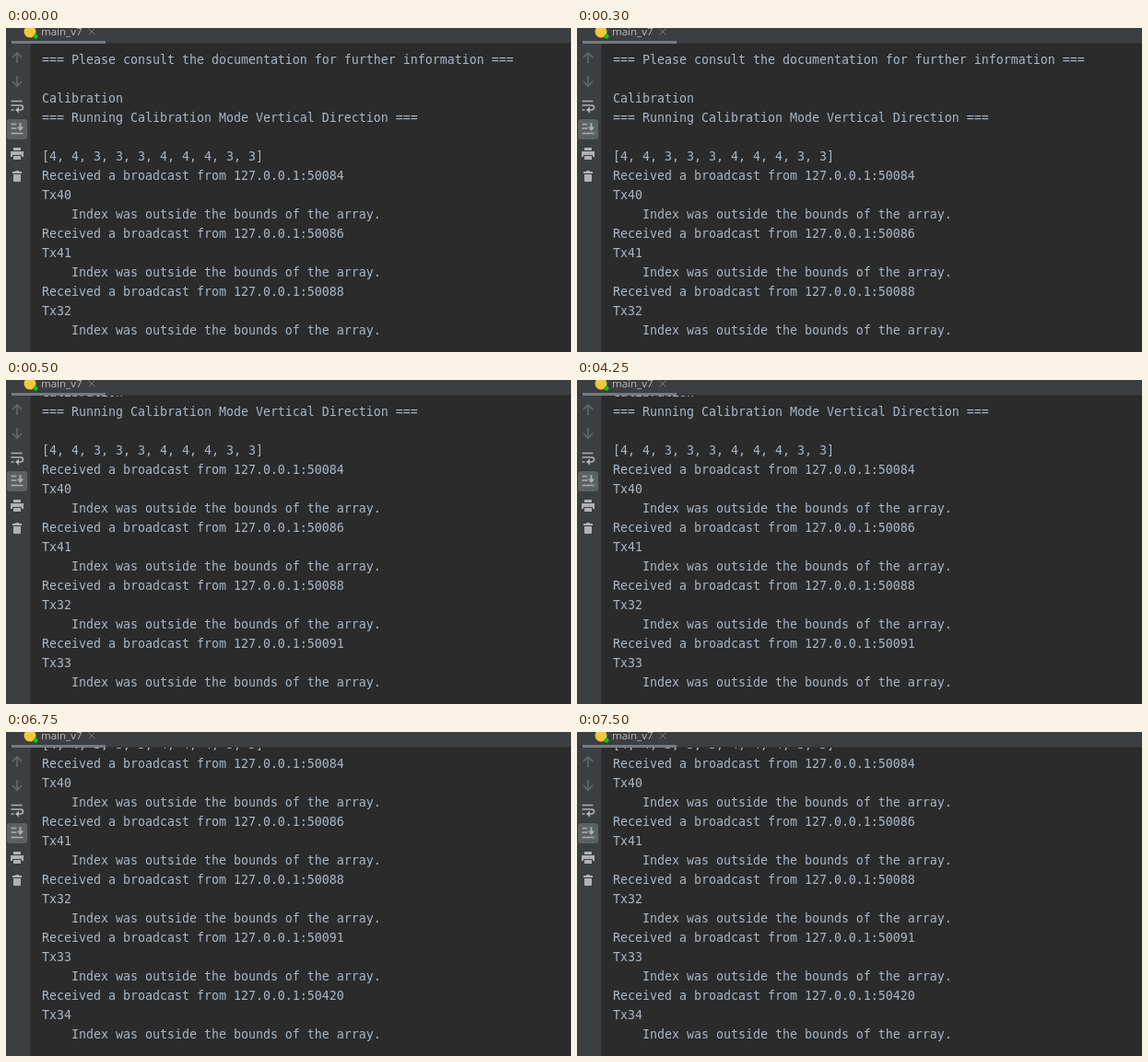
These frames come from a looping animation (613 px wide and 352 px high, 8000 ms). An HTML page:

```html
<!DOCTYPE html>
<html lang="en">
<head>
<meta charset="utf-8">
<title>Console log</title>
<style>
  html, body { margin: 0; width: 100%; height: 100%; overflow: hidden; background: #2b2b2b; }
  svg { display: block; width: 613px; height: 352px; }
  #log text { font: 13.29px "DejaVu Sans Mono", "Noto Sans Mono", monospace; fill: #a9b7c6; white-space: pre; }
  .tab { font: 11.5px "Open Sans", "Noto Sans", sans-serif; fill: #bbbbbb; }
  .icon { fill: none; stroke: #afb1b3; stroke-width: 1.7; }
  .off { stroke: #64676a; }
  .solid { fill: #afb1b3; stroke: none; }
</style>
</head>
<body>
<svg viewBox="0 0 613 352">
  <defs>
    <clipPath id="view"><rect x="27" y="17" width="586" height="335"/></clipPath>
  </defs>
  <rect width="613" height="352" fill="#2b2b2b"/>
  <g clip-path="url(#view)"><g id="log"></g></g>

  <!-- toolbar and tab strip -->
  <rect width="26" height="352" fill="#3c3f41"/>
  <rect x="26" y="17" width="1" height="335" fill="#323434"/>
  <rect width="613" height="16" fill="#3c3f41"/>
  <rect y="16" width="613" height="1" fill="#323232"/>
  <rect x="6" y="14" width="102" height="3" fill="#747a80"/>
  <circle cx="26" cy="4" r="6.5" fill="#f0c93f"/>
  <circle cx="32" cy="9" r="2.5" fill="#17c41c"/>
  <text class="tab" x="38" y="8">main_v7</text>
  <path d="M89.5 .5l7 7M96.5 .5l-7 7" stroke="#717476" fill="none"/>

  <rect x="1" y="99" width="22" height="22" rx="3" fill="#5c6164"/>
  <path class="icon off" d="M12 38V27M7 32l5-5 5 5"/>
  <path class="icon off" d="M12 52v11M7 58l5 5 5-5"/>
  <g class="icon">
    <path d="M5.5 79.5h12M5.5 84h10.5a2.5 2.5 0 0 1 0 5H13M5.5 89h3"/>
    <path class="solid" d="M14 85.5v7L10 89z"/>
    <path d="M5.5 104.5h6M5.5 109h6M5.5 114.5h13M15.5 103v6"/>
    <path class="solid" d="M12 107.5h7l-3.5 4.5z"/>
  </g>
  <g class="solid">
    <path d="M8 130h8v3H8zM5 134h14v6h-2v-2H7v2H5zM8 139h8v4H8z"/>
    <path d="M10 155h4v1h3v2H7v-2h3zM8 159h8v7q0 1-1 1H9q-1 0-1-1z"/>
  </g>
</svg>
<script>
const LOOP = 8000, LINE = 21, BATCH = 3;
const batchTimes = [500, 6750];
const log = document.getElementById("log");

const entry = (port, id) => [
  `Received a broadcast from 127.0.0.1:${port}`,
  `Tx${id}`,
  "    Index was outside the bounds of the array.",
];
const lines = [
  "=== Please consult the documentation for further information ===",
  "",
  "Calibration",
  "=== Running Calibration Mode Vertical Direction ===",
  "",
  "[4, 4, 3, 3, 3, 4, 4, 4, 3, 3]",
  ...entry(50084, 40),
  ...entry(50086, 41),
  ...entry(50088, 32),
  ...entry(50091, 33),
  ...entry(50420, 34),
];
const startCount = lines.length - BATCH * batchTimes.length;

const rows = lines.map((line, i) => {
  const row = document.createElementNS("http://www.w3.org/2000/svg", "text");
  row.setAttribute("x", 39);
  row.setAttribute("y", 39 + i * LINE);
  row.textContent = line;
  return log.appendChild(row);
});

// Each new batch scrolls the log so its last line stays at the bottom.
function render(time) {
  const added = BATCH * batchTimes.filter(t => time >= t).length;
  log.setAttribute("transform", `translate(0 ${-added * LINE})`);
  rows.forEach((row, i) =>
    row.setAttribute("visibility", i < startCount + added ? "visible" : "hidden"));
}

const start = performance.now();
function tick() {
  render((performance.now() - start) % LOOP);
  requestAnimationFrame(tick);
}
tick();
</script>
</body>
</html>
```
